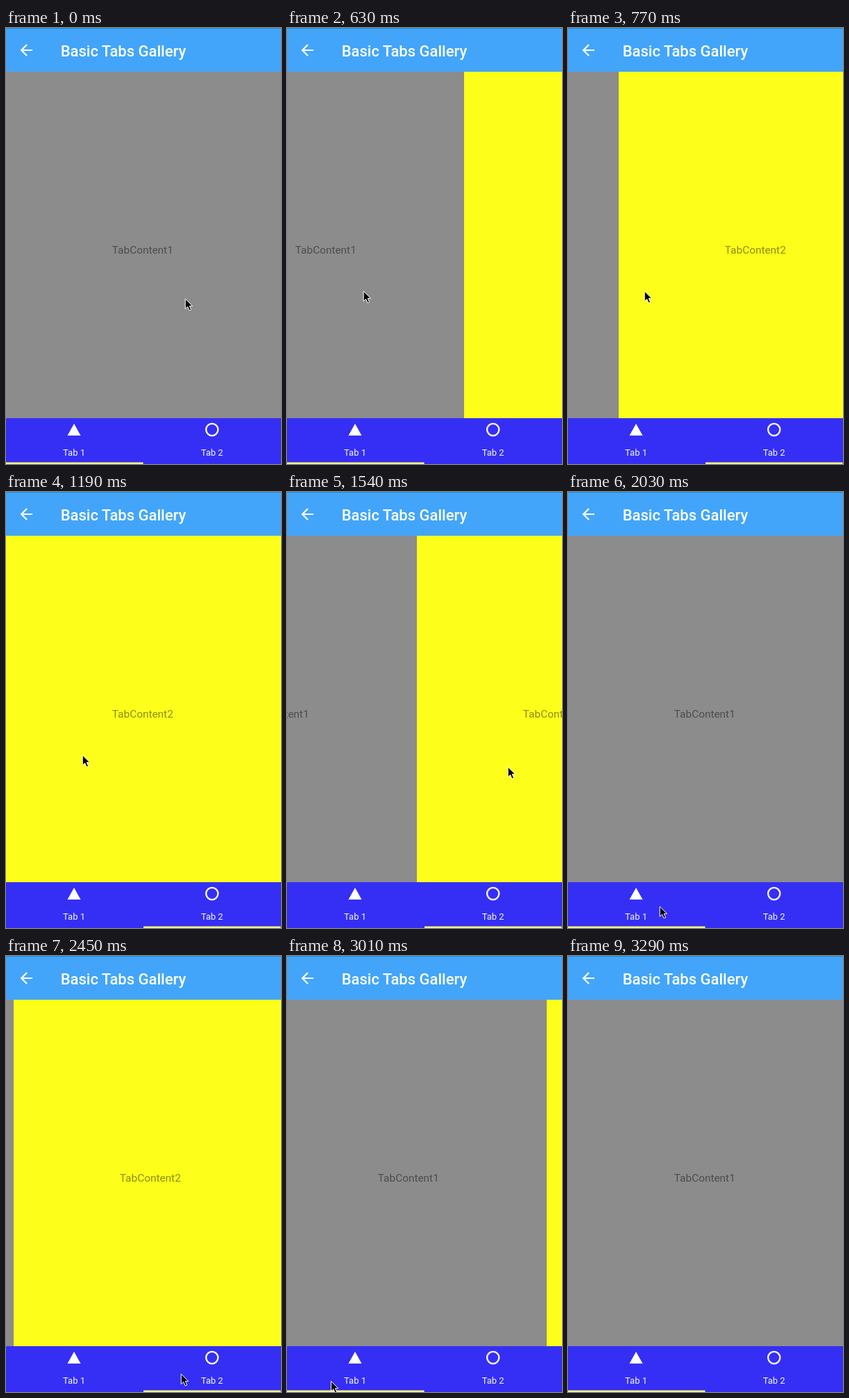
Recreate the animation shown at these times as an HTML page. Size 396 by 628 pixels, loop 3500 ms.

```html
<!DOCTYPE html>
<html lang="en">
<head>
<meta charset="utf-8">
<title>Basic Tabs Gallery</title>
<style>
  html, body { margin: 0; width: 100%; height: 100%; overflow: hidden; }
  svg { display: block; width: 396px; height: 628px; font-family: Roboto, sans-serif; }
  .title { font-size: 22px; font-weight: 500; fill: #fff; }
  .content { font-size: 15.4px; fill: #000; fill-opacity: .45; text-anchor: middle; }
  .label { font-size: 13px; fill: #f8f8f4; text-anchor: middle; }
</style>
</head>
<body>
<svg viewBox="0 0 396 628">
  <g id="pages">
    <rect y="63" width="396" height="499" fill="#8c8c8c"/>
    <text class="content" x="196.8" y="325">TabContent1</text>
    <rect x="396" y="63" width="396" height="499" fill="#fdff1a"/>
    <text class="content" x="592.8" y="325">TabContent2</text>
  </g>

  <rect width="396" height="63" fill="#42a5fa"/>
  <rect width="396" height="1" fill="#2f7fc4"/>
  <path transform="translate(16.2 18.9) scale(1.09)" fill="#fff"
    d="M20 11H7.83l5.59-5.59L12 4l-8 8 8 8 1.41-1.41L7.83 13H20z"/>
  <text class="title" x="78.7" y="41">Basic Tabs Gallery</text>

  <rect y="562" width="396" height="66" fill="#352ff6"/>
  <path d="M98 570l9.5 17h-19z" fill="#fff"/>
  <circle cx="296.7" cy="578.5" r="8.6" fill="none" stroke="#fff" stroke-width="2.3"/>
  <text class="label" x="98" y="616">Tab 1</text>
  <text class="label" x="296.7" y="616">Tab 2</text>
  <rect id="indicator" y="625.6" width="197.5" height="2.4" fill="#fbf884"/>

  <path id="cursor" d="M0 0V14.5L3.4 11.4 5.9 17 8.4 15.9 6 10.4H10.4Z"
    fill="#000" stroke="#fff" stroke-width="1" stroke-linejoin="round"/>
</svg>
<script>
const LOOP = 3500, STEP = 70, LAST = 3290;
const WIDTH = 396, SLOP = 7, SETTLE = 300, SWITCH = 100;
const [pages, indicator, cursor] =
  ['pages', 'indicator', 'cursor'].map(id => document.getElementById(id));

const progress = (t, start, duration) => Math.min(1, Math.max(0, (t - start) / duration));
const mix = (a, b, u) => a + (b - a) * u;
const smooth = u => u * u * (3 - 2 * u);
const decelerate = u => 1 - (1 - u) ** 2;

// The pointer rests between moves; each move starts and ends gently.
const home = { x: 258, y: 390 };
const moves = [
  { start: 370, end: 630, x: 110, y: 379 },
  { start: 1190, end: 1300, x: 124, y: 382 },
  { start: 1300, end: 1540, x: 318, y: 396 },
  { start: 1610, end: 2000, x: 132, y: 597 },
  { start: 2030, end: 2200, x: 252, y: 602 },
  { start: 2500, end: 2760, x: 112, y: 600 },
  { start: 2870, end: 3200, x: -14, y: 632 }
];

// Every gesture flips the tab: a swipe drags the pages, a tap has no drag.
const gestures = [
  { press: 370, release: 630 },
  { press: 1300, release: 1540 },
  { press: 2200, release: 2200 },
  { press: 2780, release: 2780 }
];

function pointer(t) {
  return moves.reduce((at, move) => {
    const u = smooth(progress(t, move.start, move.end - move.start));
    return { x: mix(at.x, move.x, u), y: mix(at.y, move.y, u) };
  }, home);
}

function dragged({ press, release }, t) {
  const distance = pointer(press).x - pointer(Math.min(t, release)).x;
  return Math.sign(distance) * Math.max(0, Math.abs(distance) - SLOP);
}

function tabs(t) {
  let scroll = 0, selected = 0;
  gestures.filter(g => g.press <= t).forEach((gesture, i) => {
    const from = i % 2, to = 1 - from;
    const settled = decelerate(progress(t, gesture.release, SETTLE));
    scroll = mix(from * WIDTH + dragged(gesture, t), to * WIDTH, settled);
    selected = mix(from, to, progress(t, gesture.release, SWITCH));
  });
  return { scroll, selected };
}

const place = (node, x, y = 0) => node.setAttribute('transform', `translate(${x} ${y})`);

function render(time) {
  const t = Math.min(Math.floor((time % LOOP) / STEP) * STEP, LAST);
  const { scroll, selected } = tabs(t);
  const { x, y } = pointer(t);
  place(pages, -Math.round(scroll));
  place(indicator, selected * WIDTH / 2);
  place(cursor, x + .2, y);
}

let start;
function tick(now) {
  start ??= now;
  render(now - start);
  requestAnimationFrame(tick);
}
render(0);
requestAnimationFrame(tick);
</script>
</body>
</html>
```
